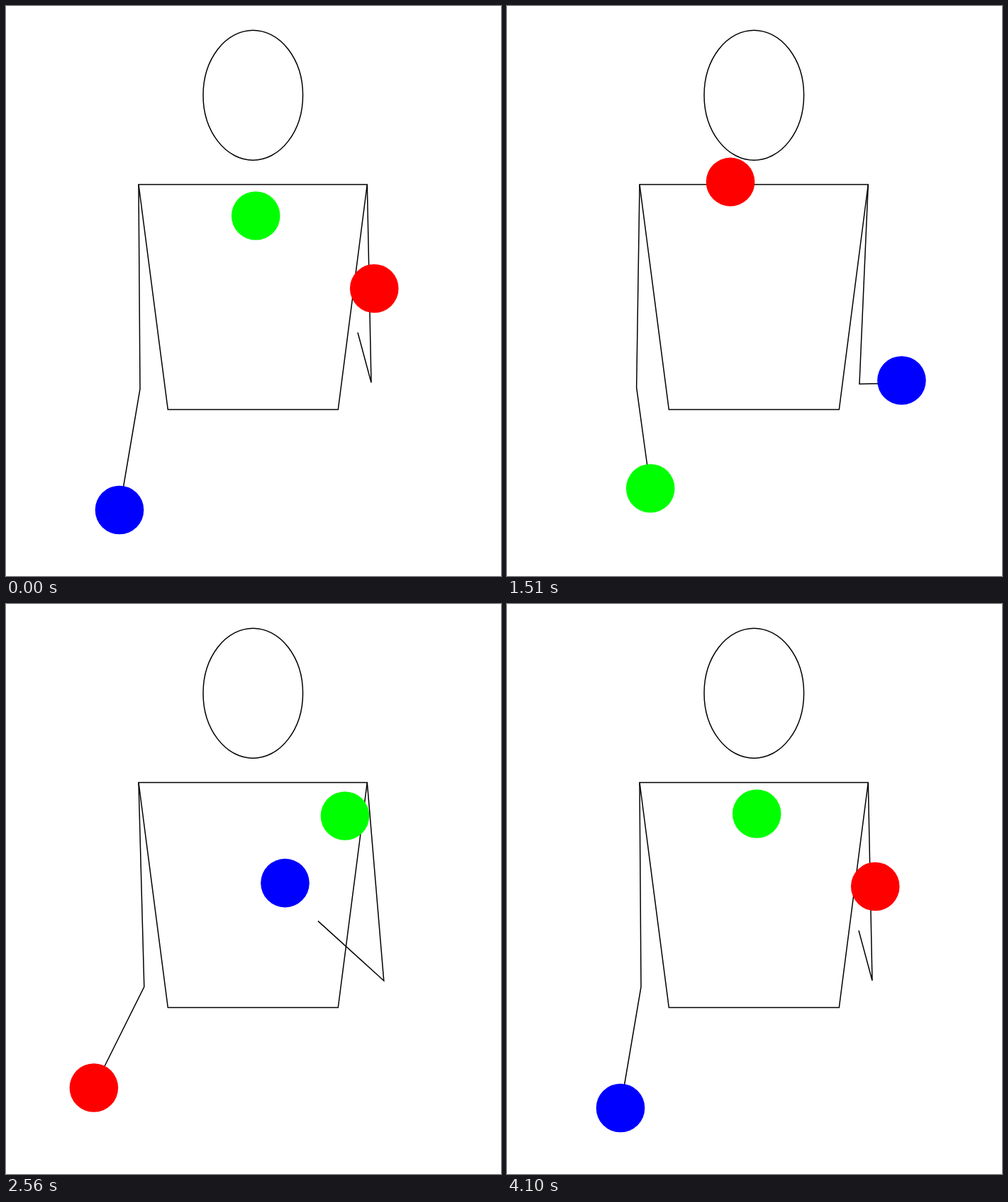
An HTML page that plays this animation: 698 px wide and 803 px high, repeating every 4150 ms.

```html
<!DOCTYPE html>
<html lang="en">
<head>
<meta charset="utf-8">
<title>Juggler</title>
<style>
  html, body { margin: 0; width: 100%; height: 100%; overflow: hidden; background: #fff; }
  svg { display: block; width: 698px; height: 803px; }
  .body { fill: none; stroke: #000; stroke-width: 1.5; }
</style>
</head>
<body>
<svg viewBox="0 0 698 803">
  <g class="body">
    <ellipse cx="348.3" cy="125.7" rx="70.3" ry="91.5"/>
    <path d="M187 251.5H509.3L468.3 568.5H228.3Z"/>
    <polyline id="left"/>
    <polyline id="right"/>
  </g>
  <circle id="green" r="34.3" fill="#0f0"/>
  <circle id="blue" r="34.3" fill="#00f"/>
  <circle id="red" r="34.3" fill="#f00"/>
</svg>
<script>
const LOOP = 4150;
const PICTURES = 90;        // the last one repeats the first pose
const CYCLE = 252;          // ticks until every ball is back in place
const HALF = CYCLE / 2;     // one throw plus one hold
const BEAT = CYCLE / 3;     // one round of a hand
const CATCH = 52, RELEASE = 106;
const WIDTH = 698;

const mod = (a, n) => ((a % n) + n) % n;
const get = id => document.getElementById(id);

function tickAt(time) {
  const step = Math.floor(time / LOOP * PICTURES + 0.7);
  const last = PICTURES - 1;
  return Math.floor(Math.min(step, last) * CYCLE / last);
}

// Left hand and elbow go round in loops with a second harmonic
function armAt(phase) {
  const a = phase / BEAT * 2 * Math.PI;
  const wave = (mean, c, s, s2) =>
    mean + c * Math.cos(a) + s * Math.sin(a) + s2 * Math.sin(2 * a);
  return {
    hand: [wave(181, -21, 76, -10), wave(585, 125, -38, 21)],
    elbow: [wave(186, 3, -18.5, 6), wave(535, 4.5, -1.5, 0)]
  };
}

// Parabola from the right hand to the left
const flightAt = v => [352.2 - 4.13 * v, 237 + 0.2345 * (v - 15.8) ** 2];

const place = ([x, y], flip) => [flip ? WIDTH - x : x, y];

function drawArm(id, phase, flip) {
  const { hand, elbow } = armAt(phase);
  const points = [[flip ? 509.3 : 187, 251.5], place(elbow, flip), place(hand, flip)];
  get(id).setAttribute('points', points.join(' '));
}

function drawBall(id, phase) {
  const w = mod(phase + HALF - RELEASE, CYCLE);
  const v = w % HALF - (HALF - RELEASE);
  const [x, y] = place(v < CATCH ? flightAt(v) : armAt(v).hand, w >= HALF);
  get(id).setAttribute('cx', x);
  get(id).setAttribute('cy', y);
}

function draw(time) {
  const tick = tickAt(time % LOOP);
  drawArm('left', tick, false);
  drawArm('right', tick + BEAT / 2, true);
  ['green', 'blue', 'red'].forEach((id, i) => drawBall(id, tick + i * BEAT));
}

let start;
function loop(now) {
  start ??= now;
  draw(now - start);
  requestAnimationFrame(loop);
}
draw(0);
requestAnimationFrame(loop);
</script>
</body>
</html>
```
